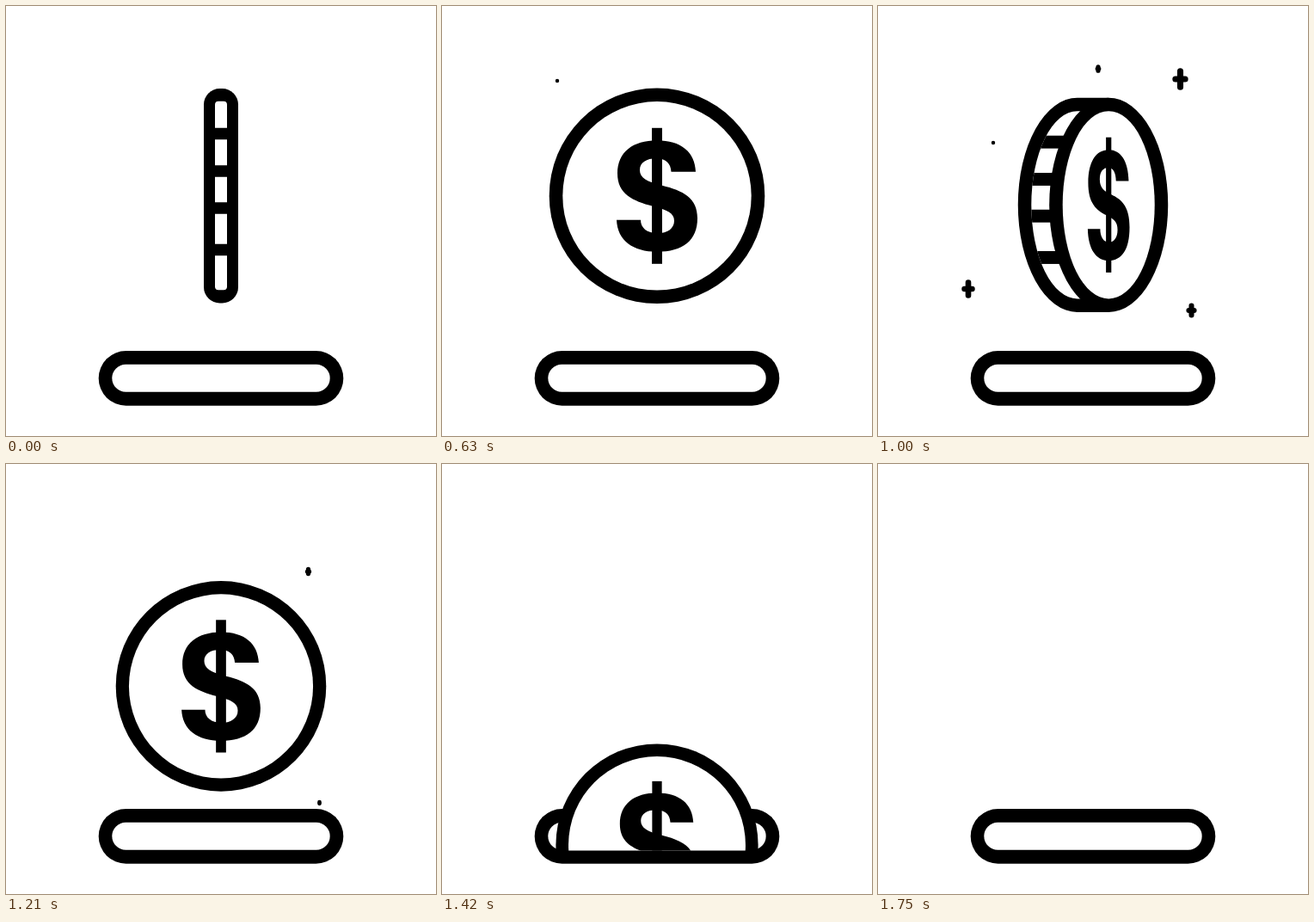
An HTML page with a canvas for the animation above (2 s loop, 500 by 500 pixels).

```html
<!DOCTYPE html>
<html>
<head>
<meta charset="utf-8">
<title>Coin drop</title>
<style>
html, body { margin: 0; width: 100%; height: 100%; overflow: hidden; background: #fff; }
canvas { display: block; }
</style>
</head>
<body>
<canvas id="stage" width="500" height="500"></canvas>
<script>
const ctx = document.getElementById('stage').getContext('2d');
const LOOP = 2000, FPS = 24;

// Dollar sign, centred on 250,221
const dollar = new Path2D(`M295 193C294 170 278 156.5 250 156.5C222 156.5 204 170 204 195
  C204 219 222 227 245 233C262 237.5 270 241 270 250C270 259 262 264.5 251 264.5
  C238 264.5 231 258 231 249H203C204 273 222 286 250 286C280 286 297 273 297 247
  C297 223 280 215 256 209C238 204.5 230 200 230 191C230 182 238 177.5 249 177.5
  C260 177.5 266 183 266.5 193Z`);

const ridges = [-73.5, -30, 13, 61.5];

// Frame, centre height and speed of the falling coin
const fall = [[18, 220.8, 0], [29, 258.4, 6.9], [34, 443, 30], [42, 557.5, 2]];

// x, height at frame 24, first frame, life in frames, largest width
const sparkles = [
  [134, 159, 14, 11, 14],
  [256, 73, 16.5, 10, 13.5],
  [351.5, 85, 19, 12, 22],
  [364.5, 354, 20, 10.5, 16],
  [105, 329, 18, 11, 17]
];

function fill(path, color) {
  ctx.fillStyle = color;
  ctx.fill(path);
}

function ellipse(x, rx, ry) {
  const p = new Path2D();
  p.ellipse(x, 0, rx, ry, 0, 0, 7);
  return p;
}

function pill(x, y, w, h, r, color) {
  const p = new Path2D();
  p.roundRect(x, y, w, h, r);
  fill(p, color);
}

function coinY(f) {
  if (f <= 18) return fall[0][1];
  const i = fall.findIndex(k => k[0] >= f);
  const [f0, y0, v0] = fall[i - 1], [f1, y1, v1] = fall[i];
  const d = f1 - f0, t = (f - f0) / d, e = t * t * (3 - 2 * t);
  return y0 + (y1 - y0) * e + d * t * (1 - t) * (v0 * (1 - t) - v1 * t);
}

function face(x, rx, squeeze) {
  fill(ellipse(x, rx, 125.3), '#000');
  fill(ellipse(x, rx - 15.6, 109.7), '#fff');
  ctx.save();
  ctx.translate(x, 0);
  ctx.scale(squeeze, 1);
  ctx.translate(-250, -221);
  fill(dollar, '#000');
  ctx.fillRect(244, 142, 12, 158);
  ctx.restore();
}

function drawRidges(x, w, shift, h) {
  ctx.fillStyle = '#000';
  for (const y of ridges) ctx.fillRect(x, y + shift - h / 2, w, h);
}

function edgeOn() {
  pill(-20, -124.8, 40, 249.4, 18.5, '#000');
  pill(-7, -110, 14, 219.5, 4, '#fff');
  drawRidges(-8, 16, 1.2, 13.5);
}

// side: 1 shows the rim on the right, -1 on the left
function turned(side) {
  const off = 18.3 * side;
  const hull = (rx, ry) => {
    const p = ellipse(off, rx, ry);
    p.rect(-18.3, -ry, 36.6, 2 * ry);
    return p;
  };
  ctx.translate(0, -0.6);
  fill(hull(69.4, 125.3), '#000');
  ctx.save();
  ctx.clip(hull(53.8, 109.7));
  ctx.fillStyle = '#fff';
  ctx.fillRect(-90, -125, 180, 250);
  drawRidges(-90, 180, 0, 15);
  ctx.restore();
  face(-off, 69.4, 0.52);
}

function coin(f) {
  if (f >= 42) return;
  ctx.save();
  ctx.beginPath();
  ctx.rect(0, 0, 500, 449.4);
  ctx.clip();
  ctx.translate(250, coinY(f));
  const size = 1 - 0.00006 * Math.max(0, f - 18) ** 2.5;
  ctx.scale(size, size);
  const turn = f < 6 ? f + 21 : f;
  if (turn < 18 || turn >= 27) face(0, 125.3, 1);
  else if (turn < 21) turned(1);
  else if (turn < 24) edgeOn();
  else turned(-1);
  ctx.restore();
}

function sparkle(f, [x, y24, start, life, max]) {
  const t = (f - start) / life;
  if (t <= 0 || t >= 1) return;
  const w = max * (1 - Math.abs(2 * t - 1));
  const y = y24 + 8 * (f - 24);
  const line = 4 + 0.17 * w;
  const a = Math.max(0.01, (w - line) / 2), b = Math.max(0.01, (1.4 * w - line) / 2);
  ctx.lineWidth = line;
  ctx.lineCap = 'round';
  ctx.strokeStyle = '#000';
  ctx.beginPath();
  ctx.moveTo(x - a, y);
  ctx.lineTo(x + a, y);
  ctx.moveTo(x, y - b);
  ctx.lineTo(x, y + b);
  ctx.stroke();
}

function draw() {
  // Time advances in ticks of 10 ms
  const t = Math.floor(performance.now() % LOOP / 10) * 10 + 4;
  const f = Math.floor(t * FPS / 1000);
  ctx.fillStyle = '#fff';
  ctx.fillRect(0, 0, 500, 500);
  pill(107.7, 401, 284.6, 63.8, 31.9, '#000');
  pill(123.3, 416.8, 253.4, 32, 16, '#fff');
  coin(f);
  for (const s of sparkles) sparkle(f, s);
  requestAnimationFrame(draw);
}
draw();
</script>
</body>
</html>
```
